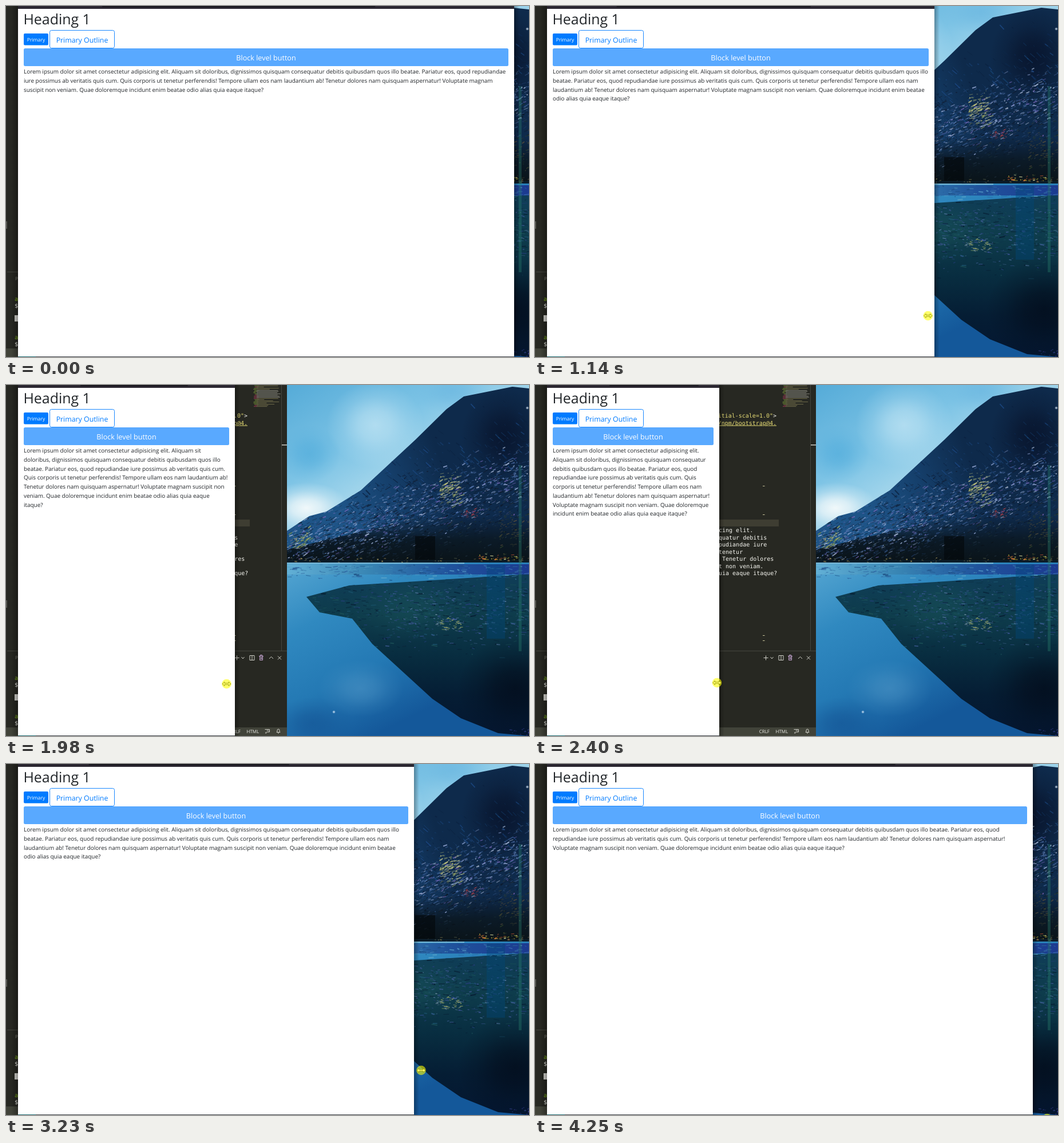
Write an HTML page with a canvas that moves like this. It is 914 px wide and 613 px high and loops after 4.31 s.

```html
<!DOCTYPE html>
<html lang="en">
<head>
<meta charset="utf-8">
<title>Responsive page</title>
<style>
html, body { margin: 0; width: 100%; height: 100%; overflow: hidden; background: #272822; }
canvas, svg { position: absolute; left: 0; top: 0; width: 914px; height: 613px; display: block; }
text { font-family: "Open Sans", "Noto Sans", sans-serif; text-rendering: geometricPrecision; white-space: pre; }
.code text { font-family: "DejaVu Sans Mono", monospace; font-size: 10px; fill: #f8f8f2; }
.code .str { fill: #e6db74; }
.code .user { fill: #7fb518; }
.ui { font-size: 8px; fill: #f0f0ea; }
.icons { fill: none; stroke: #d0d0c8; stroke-width: 1; }
.mid { text-anchor: middle; }
#para text { font-size: 9.93px; fill: #212529; }
</style>
</head>
<body>
<canvas id="photo" width="914" height="613"></canvas>
<svg viewBox="0 0 914 613">
  <defs>
    <linearGradient id="shade"><stop offset="0" stop-opacity=".32"/><stop offset="1" stop-opacity="0"/></linearGradient>
  </defs>

  <g id="editor">
    <path fill="#272822" d="M0 0H491V613H0Z"/>
    <path fill="#3e3d32" d="M21 235H426V247H21Z"/>
    <path fill="#414339" d="M0 598H491V613H0Z"/>
    <path fill="none" stroke="#45463f" d="M2 464.5H491M481.5 0V464"/>
    <path fill="#d8d8d2" d="M482 104H491V105.4H482Z"/>
    <path fill="#565750" d="M0 376H2V389H0Z"/>
    <g id="map"></g>
    <g class="code" id="code"></g>
    <g class="icons">
      <path d="M399.5 476.5h8m-4-4v8M411.5 475l2.5 3 2.5-3M426 472.500h8v8h-8zm4 0v8M460 478l3.5-3.500 3.5 3.500M475 473.500l6 6m0-6l-6 6"/>
      <path stroke="#c3a3cf" d="M442 473.500h8m-5.500 0v-2h3v2m-4 .5v6.500h5v-6.500m-3 1v4m1.500-4v4"/>
      <path d="M452.500 601.500h8v4.500h-4l-2.500 2.500V606M456 604.500a1.500 1.500 0 1 1 3 0M473 606.500h6l-1-1.500v-2a2 2 0 0 0-4 0v2zm2 1.500h2"/>
    </g>
    <text class="ui" x="410" y="607.500" text-anchor="end">CRLF</text>
    <text class="ui" x="420.500" y="607.500">HTML</text>
    <text class="ui" x="16" y="479" style="fill:#85857c">PROBLEMS</text>
    <g class="code">
      <text class="user" x="15" y="515">an</text>
      <text x="15" y="527">$</text>
      <path fill="#d6d6d0" d="M15 540H21V551H15Z"/>
      <text class="user" x="15" y="582">an</text>
      <text x="15" y="594">$</text>
    </g>
  </g>

  <rect x="-21" y="0" width="12" height="613" fill="url(#shade)" transform="scale(-1 1)"/>
  <rect id="cast" y="0" width="9" height="613" fill="url(#shade)"/>

  <g id="page">
    <rect id="sheet" x="21" y="0" height="613" fill="#fff"/>
    <rect id="bar" x="21" y="0" height="5" fill="#2b2731"/>
    <rect id="address" y="0" height="2" rx="1" fill="#18171d"/>
    <rect id="foot" x="21" y="612" height="1" fill="#44484d"/>
    <path fill="#1f6b70" d="M21 612H52V613H21Z"/>
    <text x="30.500" y="32" font-size="24.900" fill="#212529">Heading 1</text>
    <rect x="31" y="48" width="43" height="20.500" rx="2" fill="#007bff"/>
    <text class="mid" x="52.500" y="61.700" font-size="8.600" fill="#fff">Primary</text>
    <rect x="76.500" y="42.500" width="113" height="31" rx="3" fill="#fff" stroke="#007bff" stroke-width=".9"/>
    <text class="mid" x="133" y="63.700" font-size="12.350" fill="#007bff">Primary Outline</text>
    <rect id="block" x="31" y="74" height="31" rx="2.500" fill="#59a9ff"/>
    <text id="label" class="mid" y="95.400" font-size="12.600" fill="#fff">Block level button</text>
    <g id="para"></g>
  </g>

  <g id="cursor">
    <path fill="#fff" stroke="#111" stroke-width=".9" d="M-7.500 0L-3.500-3.500V-1.200H3.500V-3.500L7.500 0L3.500 3.500V1.200H-3.500V3.500Z"/>
    <circle r="8.300" fill="#ffff00" fill-opacity=".58"/>
  </g>
</svg>

<script>
const $ = id => document.getElementById(id);
function set(el, attrs) { for (const k in attrs) el.setAttribute(k, attrs[k]); }
function put(parent, tag, attrs, str = '') {
  const el = document.createElementNS('http://www.w3.org/2000/svg', tag);
  set(el, attrs);
  el.textContent = str;
  return parent.appendChild(el);
}
let seed = 7;
const rnd = () => (seed = (seed * 16807) % 2147483647) / 2147483647;
const bell = () => rnd() + rnd() + rnd() - 1.5;
const pick = list => list[Math.floor(rnd() * list.length)];

// ---- lake and mountain backdrop ----
const c = $('photo').getContext('2d');
function fade(x0, y0, x1, y1, ...cols) {
  const g = c.createLinearGradient(x0, y0, x1, y1);
  cols.forEach((col, i) => g.addColorStop(i / (cols.length - 1), col));
  return g;
}
function box(fill, x, y, w, h) {
  c.fillStyle = fill;
  c.fillRect(x, y, w, h);
}
function blob(x, y, rx, ry, rgb, a) {
  c.save();
  c.translate(x, y);
  c.scale(rx, ry);
  const g = c.createRadialGradient(0, 0, 0, 0, 0, 1);
  [1, .75, .3, 0].forEach((k, i) => g.addColorStop(i / 3, `rgba(${rgb},${a * k})`));
  box(g, -1, -1, 2, 2);
  c.restore();
}
// fills an outline, then paints inside it
function mass(fill, outline, inside) {
  const p = new Path2D(`M${outline}Z`);
  c.fillStyle = fill;
  c.fill(p);
  c.save();
  c.clip(p);
  inside();
  c.restore();
}
// n short strokes centred on the curve y = mid(x), spread around it
function flecks(n, x0, x1, mid, spread, tilt, cols, len = 6) {
  for (let i = 0; i < n; i++) {
    const x = x0 + rnd() * (x1 - x0), y = mid(x) + bell() * spread, l = 1 + rnd() * len;
    c.strokeStyle = pick(cols);
    c.globalAlpha = .35 + rnd() * .5;
    c.lineWidth = .6 + rnd() * 1.4;
    c.beginPath();
    c.moveTo(x, y);
    c.lineTo(x + l, y + l * tilt + bell() * 2);
    c.stroke();
  }
  c.globalAlpha = 1;
}
const at = y => () => y;

function paint() {
  // sky
  box(fade(491, 0, 640, 250, '#55abd8', '#7cc3e5', '#bfe3f0'), 480, 0, 434, 312);
  blob(645, 70, 85, 75, '186,225,242', .85);
  blob(525, 215, 75, 45, '240,248,250', 1);
  blob(530, 120, 55, 50, '82,173,220', .7);
  blob(780, 10, 70, 40, '110,185,225', .8);

  // mountain, paler towards the left flank
  const slope = x => 285 - .3 * (x - 491);
  mass(fade(580, 200, 760, 130, '#1e5487', '#153f6b', '#0e2a4b'),
    '480,262 530,229 560,221 620,184 715,96 770,42 800,20 885,3 914,6 914,312 480,312', () => {
    blob(870, 90, 75, 85, '7,17,40', .8);
    flecks(350, 600, 914, x => 300 - .42 * (x - 400), 75, .9, ['#0a1f3d', '#164373', '#0d2a50', '#1c4a86'], 9);
    mass(fade(0, 230, 0, 310, 'rgba(10,22,36,0)', '#0b1a27', '#0a1318'),
      '480,290 914,185 914,312 480,312', () => {});
    flecks(800, 485, 914, x => slope(x) + 45, 60, -.4, ['#0c1626', '#1a3048', '#0a1018', '#1c3030', '#2a3c50']);
    flecks(1500, 485, 914, slope, 60, -.45, ['#0f2038', '#142a48', '#101a2c', '#24406c', '#3a5c92'], 8);
    flecks(900, 485, 914, slope, 48, -.45, ['#5e80bd', '#7868ba', '#93a7d6', '#41689c', '#b4c4e4'], 6);
    flecks(110, 757, 795, at(182), 26, -.4, ['#c9cb7c', '#a9b766', '#d8d693']);
    flecks(30, 794, 824, at(225), 10, -.3, ['#8c2d37', '#c14449'], 4);
    flecks(60, 491, 535, x => slope(x) - 4, 16, -.6, ['#a4ac50', '#6d8d55', '#c1bc68']);
    flecks(90, 860, 914, at(255), 50, -.4, ['#4b4c31', '#2f4128', '#5a4f3c'], 5);
    box('rgba(4,8,12,.65)', 715, 264, 35, 41);
  });
  flecks(60, 825, 900, at(303), 7, 0, ['#d5c63f', '#a78f30', '#c65a33', '#e0e0a0'], 5);
  box('#0b1c29', 491, 306, 423, 4);
  flecks(50, 491, 914, at(306), 4, 0, ['#8a7b4e', '#57614b', '#b5a667'], 4);

  // lake and reflection
  box(fade(491, 312, 640, 613, '#55a6d2', '#3089c0', '#2479b4', '#14589a'), 480, 310, 434, 303);
  blob(620, 530, 75, 50, '85,155,202', .5);
  blob(535, 590, 70, 45, '18,80,145', .5);
  mass(fade(0, 330, 0, 613, '#0f3d58', '#0e3c4c', '#082d40', '#051d34', '#041630'),
    '525,370 600,350 700,344 914,330 914,613 860,608 795,582 745,548 640,452 605,408 548,397', () => {
    blob(705, 390, 100, 60, '25,82,88', .5);
    flecks(650, 530, 914, at(395), 65, .04, ['#1c5670', '#0c3049', '#1c5258', '#263f7c', '#0a2938', '#061a30'], 10);
    flecks(260, 660, 914, at(395), 55, .1, ['#43589e', '#2b4a84', '#5a7ca7', '#4a64a6']);
    flecks(45, 750, 795, at(417), 12, .1, ['#96a55f', '#7892a8', '#b4b96c']);
    blob(890, 530, 100, 90, '3,10,24', .7);
    flecks(18, 880, 914, at(605), 7, 0, ['#3b3694', '#25336f'], 4);
  });
  box(fade(491, 0, 914, 0, '#62b0d6', '#3986b4', '#20539c', '#1c3a90'), 491, 313, 423, 18);
  flecks(220, 491, 914, at(325), 13, 0, ['#5ba4ca', '#3c80b0', '#2d62a0', '#1c4c80'], 10);
  box('#86bdd6', 491, 310.5, 310, 1.5);
  box('rgba(0,70,120,.4)', 840, 313, 32, 130);
  box('rgba(40,130,110,.35)', 896, 140, 5, 325);
  blob(911, 40, 3, 3, '225,240,255', .9);
  blob(573, 571, 3, 3, '225,240,255', .9);
}
paint();

// ---- text ----
const lorem = 'Lorem ipsum dolor sit amet consectetur adipisicing elit. Aliquam sit doloribus, dignissimos quisquam consequatur debitis quibusdam quos illo beatae. Pariatur eos, quod repudiandae iure possimus ab veritatis quis cum. Quis corporis ut tenetur perferendis! Tempore ullam eos nam laudantium ab! Tenetur dolores nam quisquam aspernatur! Voluptate magnam suscipit non veniam. Quae doloremque incidunt enim beatae odio alias quia eaque itaque?';
function wrap(str, room, measure) {
  const lines = [];
  let line = '';
  for (const word of str.split(' ')) {
    const next = line ? line + ' ' + word : word;
    if (line && measure(next) > room) { lines.push(line); line = word; } else line = next;
  }
  return [...lines, line];
}
c.font = '993px "Open Sans", "Noto Sans", sans-serif';
const textWidth = s => c.measureText(s).width / 100;

// code behind the page
const code = $('code');
wrap('<p>' + lorem, 66, s => s.length)
  .forEach((line, i) => put(code, 'text', { x: 26, y: 257 + i * 12.5 }, line));
const end = { 'text-anchor': 'end', class: 'str' };
put(code, 'text', { 'text-anchor': 'end', x: 422, y: 56.5 }, '>');
put(code, 'text', { ...end, x: 416, y: 56.5 }, '"width=device-width, initial-scale=1.0"');
put(code, 'text', { ...end, x: 422, y: 69.5, 'text-decoration': 'underline' }, 'https://cdn.jsdelivr.net/npm/bootstrap@4.');
for (const y of [176, 226, 437, 446]) put(code, 'rect', { x: 398, y, width: 3.5, height: 1, fill: '#c9c49a' });

for (let y = 1; y < 39; y += 2) {
  const dense = y > 8 && y < 22, row = { y, height: 1 };
  put($('map'), 'rect', { ...row, x: 432 + rnd() * 3, width: 4 + rnd() * 5, fill: pick(['#a83a58', '#7d9b3a']), opacity: .8 });
  put($('map'), 'rect', { ...row, x: 438, width: dense ? 36 + rnd() * 7 : 12 + rnd() * 28, fill: dense ? '#a5a59c' : '#8c875a', opacity: .7 });
}

const rows = Array.from({ length: 10 }, (_, i) => put($('para'), 'text', { x: 31, y: 118 + i * 15.75 }));
function flow(room) {
  const lines = wrap(lorem, room, textWidth);
  rows.forEach((row, i) => { row.textContent = lines[i] || ''; });
}

// ---- motion ----
const loop = 4310;
// the screen refreshes a little slower while the page is dragged hard
function snap(t) {
  const from = t < 1136 ? 0 : t < 3640 ? 1136 : 3640;
  const step = from === 1136 ? 69.5 : 200 / 3;
  return from + Math.floor((t - from) / step) * step;
}
// time, page edge, cursor distance from the edge, cursor height
const keys = [
  [0, 888, 1.5, 640], [66, 888, 1.5, 577], [400, 888, 1.5, 547], [560, 888, 1.5, 547],
  [867, 826, -15, 543], [1067, 716, -12, 541], [1484, 605, -5, 541], [1970, 400, -14.5, 522],
  [2190, 343, -10, 520], [2387, 322, -4, 520], [2535, 322, 5, 520], [2874, 519, 8.5, 525],
  [3221, 713, 12.5, 535], [3640, 869, 6, 541], [3840, 871, 13, 546], [4200, 871, 13, 546], [4240, 870, 25, 619]
];
function pose(t) {
  const i = Math.max(1, keys.findIndex(k => k[0] >= t));
  if (t > 4200) return keys[keys.length - 1];
  const a = keys[i - 1], b = keys[i], k = (t - a[0]) / (b[0] - a[0]);
  return a.map((v, j) => v + (b[j] - v) * k);
}
const bump = k => k > 0 && k < 1 ? Math.sin(Math.PI * k) : 0;

let shown = -1;
function draw(time) {
  const t = snap(time % loop);
  if (t === shown) return;
  shown = t;
  const [, x, lead, y] = pose(t), edge = Math.round(x);
  // the layout runs ahead of the frame at the start of each drag
  const pad = Math.round(10 - 6 * bump((t - 600) / 540) - 4 * bump((t - 2600) / 540));
  const right = edge - pad, over = edge - 605;
  for (const id of ['sheet', 'bar', 'foot']) set($(id), { width: edge - 21 });
  set($('cast'), { x: edge });
  const left = 130 + Math.max(0, over) * .134;
  set($('address'), { x: left, width: 402 + over * (over > 0 ? .86 : .41) - left });
  set($('block'), { width: right - 31 });
  set($('label'), { x: (31 + right) / 2 });
  flow(right - 31);
  set($('cursor'), { transform: `translate(${x + lead} ${y})` });
}
function tick() {
  draw(performance.now());
  requestAnimationFrame(tick);
}
draw(0);
requestAnimationFrame(tick);
</script>
</body>
</html>
```
